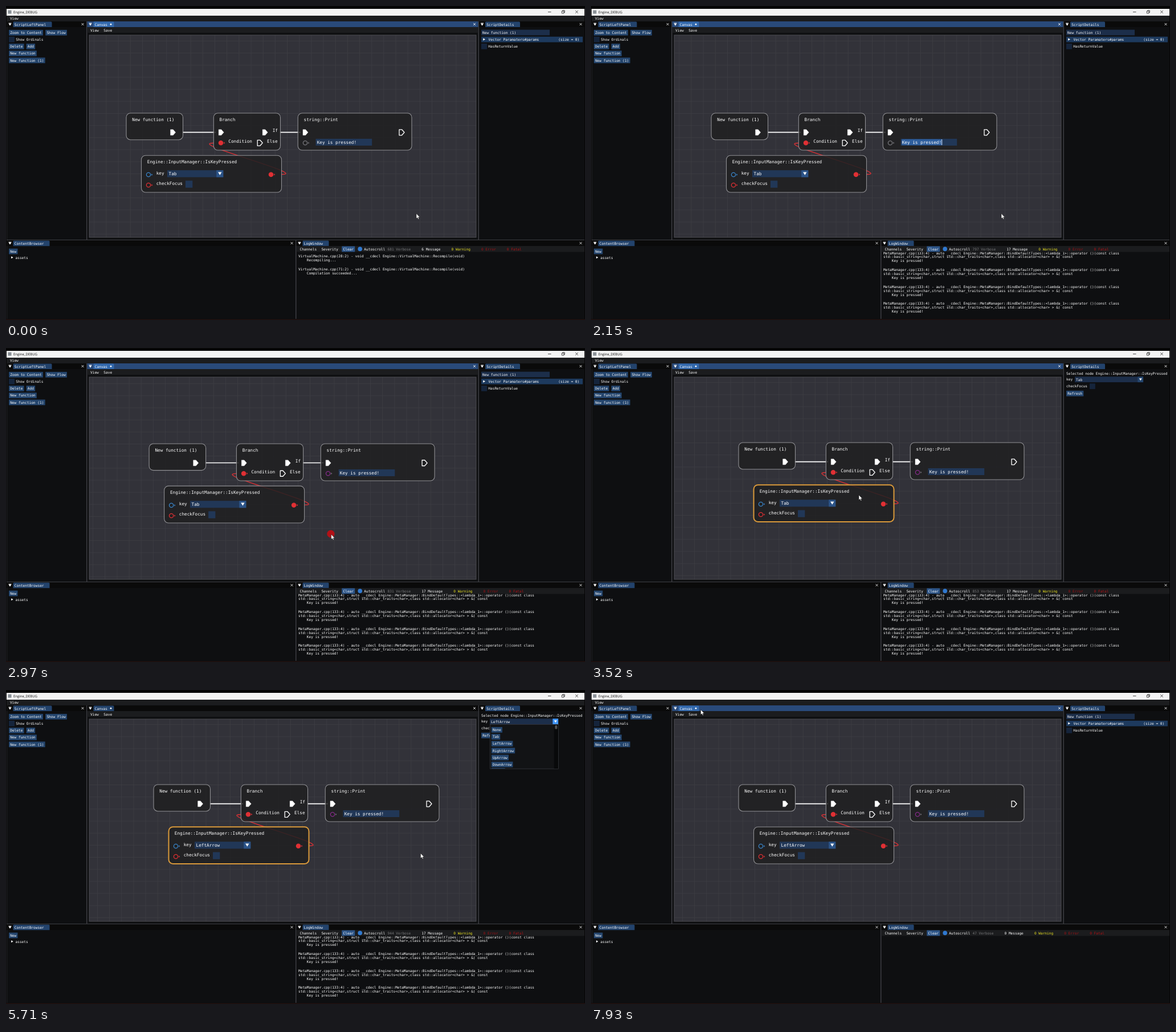
Recreate the animation shown at these times as an HTML page. Size 1016 by 551 pixels, loop 8000 ms.

```html
<!DOCTYPE html>
<html lang="en">
<head>
<meta charset="utf-8">
<title>Engine_DEBUG</title>
<style>
html, body { margin: 0; width: 100%; height: 100%; overflow: hidden; background: #0b0b0b; }
svg { display: block; width: 1016px; height: 551px; }
text { font-family: "DejaVu Sans Mono", monospace; text-rendering: geometricPrecision; white-space: pre; }
</style>
</head>
<body>
<svg id="stage" viewBox="0 0 1016 551"></svg>
<script>
const LOOP = 8000;
const UI = 6.15, NODE = 7.69, ADV = 3.704;
const C = {
  win: '#0e0f11', bar: '#0a0a0a', barOn: '#294a7a', tab: '#23436c', tabOn: '#3369ad',
  menu: '#1b1c1e', btn: '#24456d', hot: '#4296fa', frame: '#1c2e4a', box: '#15243b',
  red: '#e03034', gap: '#3c3d42'
};
const stage = document.getElementById('stage');

function el(tag, attrs, parent = stage) {
  const e = document.createElementNS('http://www.w3.org/2000/svg', tag);
  for (const k in attrs) e.setAttribute(k, attrs[k]);
  parent.appendChild(e);
  return e;
}
const set = (e, k, v) => e.setAttribute(k, v);
const show = (e, on) => set(e, 'display', on ? 'inline' : 'none');
const group = (parent = stage, attrs = {}) => el('g', attrs, parent);
const rect = (x, y, w, h, fill, p, more = {}) => el('rect', { x, y, width: w, height: h, fill, ...more }, p);
const path = (d, attrs, p) => el('path', { d, fill: 'none', ...attrs }, p);

// yc is the middle of the capitals
function text(s, x, yc, p, size = UI, fill = '#fff') {
  const e = el('text', { x, y: yc + size * 0.36, 'font-size': size, fill }, p);
  e.textContent = s;
  return e;
}
function button(s, x, yc, p, fill = C.btn) {
  const r = rect(x, yc - 4.9, s.length * ADV + 4.4, 9.8, fill, p);
  text(s, x + 2.2, yc, p);
  return r;
}
function cross(x, y, p, color = '#fff', r = 2) {
  path(`M${x - r},${y - r}l${2 * r},${2 * r}m0,${-2 * r}l${-2 * r},${2 * r}`, { stroke: color, 'stroke-width': 0.8 }, p);
}
const down = (x, y, r, p) => path(`M${x - r},${y - r * 0.75}h${2 * r}l${-r},${r * 1.6}z`, { fill: '#fff' }, p);
const right = (x, y, r, p) => path(`M${x - r * 0.8},${y - r}v${2 * r}l${r * 1.7},${-r}z`, { fill: '#fff' }, p);

function panel(title, x, y, w, h, tabW) {
  rect(x, y, w, h, C.win);
  const bar = rect(x, y, w, 10, C.bar);
  const tab = path(`M${x + 11},${y + 10}v-8q0,-1.5 1.5,-1.5h${tabW - 3}q1.5,0 1.5,1.5v8z`, { fill: C.tab });
  rect(x + 3, y + 2.6, 5, 0.9, '#fff');
  down(x + 5.5, y + 5.6, 2.4);
  text(title, x + 13.3, y + 5.3);
  cross(x + w - 6.5, y + 5, stage);
  return on => {
    set(bar, 'fill', on ? C.barOn : C.bar);
    set(tab, 'fill', on ? C.tabOn : C.tab);
  };
}

// ---- window frame
rect(0, 0, 1016, 551, '#050505');
rect(1, 5, 1014, 12, '#f3f3f3');
rect(3.5, 7.5, 6, 6, '#8a9096');
el('text', { x: 13, y: 13, 'font-size': 6, fill: '#111', style: 'font-family:"Open Sans",sans-serif' }).textContent = 'Engine_DEBUG';
path('M951,10.5h5.5M975.3,9h3.7v3.7h-3.7zM976.6,9v-1.2h3.7v3.7h-1.3', { stroke: '#222', 'stroke-width': 0.8 });
cross(1001.5, 10.3, stage, '#222', 2.3);
rect(1, 17, 1014, 10, C.menu);
text('View', 7, 22.2);
rect(1, 27, 1014, 522, C.gap);
rect(0, 549.5, 1016, 1.5, '#241312');

panel('ScriptLeftPanel', 1.5, 27, 139.5, 383, 68);
const focusCanvas = panel('Canvas', 142.5, 27, 686, 383, 36);
const focusDetails = panel('ScriptDetails', 830, 27, 185, 383, 61);
panel('ContentBrowser', 1.5, 411.2, 506.5, 138, 64);
const focusLog = panel('LogWindow', 509.5, 411.2, 505.5, 138, 46);
el('circle', { cx: 184, cy: 32.2, r: 1.4, fill: '#fff' });

// ---- left panel and content browser
button('Zoom to Content', 5, 46.8);
button('Show Flow', 69.2, 46.8);
rect(5, 53.8, 10, 9.8, C.box);
text('Show Ordinals', 17.3, 59);
button('Delete', 5, 71);
button('Add', 35.6, 71);
button('New function', 5, 83.2);
button('New function (1)', 5, 95.4);
button('New', 5, 430.6);
right(10.8, 441.2, 2, stage);
text('assets', 16.5, 441.4);

// ---- node canvas
rect(142.5, 37, 686, 10, C.menu);
text('View', 148, 42.4);
text('Save', 171.3, 42.4);
const defs = el('defs', {});
rect(146, 51, 679, 355, '#000', el('clipPath', { id: 'view' }, defs));
rect(510, 431.5, 505, 118, '#000', el('clipPath', { id: 'logView' }, defs));
const GRID = 21.17;
const grid = el('pattern', { id: 'grid', width: GRID, height: GRID, patternUnits: 'userSpaceOnUse' }, defs);
rect(0, 0, GRID, GRID, '#323239', grid);
path(`M.5,0V${GRID}M0,.5H${GRID}`, { stroke: '#3c3c43', 'stroke-width': 0.8 }, grid);
rect(146, 51, 679, 355, 'url(#grid)', stage);
const clip = group(stage, { 'clip-path': 'url(#view)' });
const nodes = group(clip);

const link = (d, stroke, w) => path(d, { stroke, 'stroke-width': w }, nodes);
link('M309,221.6H368', '#fff', 1.6);
link('M480,221.6H517', '#fff', 1.6);
link('M484,295.5C532,295.5 316,240.5 364,240.5', C.red, 1.3);

function node(title, x, y, w, h) {
  const r = rect(x, y, w, h, 'rgba(32,32,33,.84)', nodes, { rx: 7.5, stroke: '#8f8f93', 'stroke-width': 1.1 });
  text(title, x + 10.3, y + 11.5, nodes, NODE);
  return r;
}
function flow(x, y, filled) {
  path(`M${x},${y - 5}h4.6l4.4,5l-4.4,5h-4.6z`, {
    fill: filled ? '#fff' : 'none', stroke: '#fff', 'stroke-width': filled ? 0.4 : 1.3, 'stroke-linejoin': 'round'
  }, nodes);
}
function pin(x, y, color, filled) {
  path(`M${x + 5.2},${y - 1.8}v3.6l2.1,-1.8z`, { fill: color }, nodes);
  return el('circle', { cx: x, cy: y, r: 3.6, fill: filled ? color : '#202021', stroke: color, 'stroke-width': 1.3 }, nodes);
}
node('New function (1)', 211, 188, 99.5, 46.7);
flow(288.6, 221.8, true);

node('Branch', 364.3, 188, 117.2, 65);
flow(373.2, 221.8, true);
flow(450.2, 221.8, true);
flow(441.2, 240.3, false);
pin(377, 240.3, C.red, true);
text('Condition', 390.3, 237.2, nodes, NODE);
text('If', 467.7, 218.6, nodes, NODE);
text('Else', 458, 237.2, nodes, NODE);

node('string::Print', 512.2, 188, 199.8, 65);
flow(521, 221.8, true);
flow(690, 221.8, false);
const valuePin = pin(525, 240.3, '#77777c', false);
rect(543.5, 233, 98.7, 12, '#213757', nodes);
const marked = group(nodes);
rect(545.3, 233.8, 71, 10.4, '#2f5f9e', marked);
const caret = rect(615.3, 234, 0.8, 10, '#fff', marked);
text('Key is pressed!', 545.7, 239.2, nodes, NODE);

const keyNode = node('Engine::InputManager::IsKeyPressed', 237.5, 262.2, 246, 64.8);
pin(250, 296, '#3a86cc', false);
pin(250, 314.3, C.red, false);
pin(465, 295.8, C.red, true);
text('key', 263.7, 293.2, nodes, NODE);
rect(283, 288.2, 98.3, 12.2, '#213757', nodes);
rect(369.2, 288.2, 12.1, 12.2, '#2c5488', nodes);
down(375.3, 294, 3.2, nodes);
const nodeKey = text('Tab', 285.5, 294.6, nodes, NODE);
text('checkFocus', 263.7, 311.2, nodes, NODE);
rect(315, 306.5, 12.3, 12.3, '#213757', nodes);
rect(146, 51, 679, 355, 'none', stage, { stroke: '#55555b', 'stroke-width': 0.8 });

// ---- details: function view and node view
const fnView = group();
rect(834, 41.6, 120, 9.8, C.frame, fnView);
text('New function (1)', 836, 46.7, fnView);
rect(834, 53.8, 178, 9.8, '#1d3a5e', fnView);
right(839, 58.6, 2.2, fnView);
text('Vector Paramaters#params', 846.6, 58.8, fnView);
text('(size = 0)', 969.3, 58.8, fnView);
rect(834, 66, 10, 9.8, C.box, fnView);
text('HasReturnValue', 846.3, 71.2, fnView);

const nodeView = group();
text('Selected node Engine::InputManager::IsKeyPressed', 834, 45, nodeView);
text('key', 834, 54.8, nodeView);
rect(849, 50.3, 120, 9.8, C.frame, nodeView);
const drop = rect(959.3, 50.3, 9.8, 9.8, C.btn, nodeView);
down(964.3, 55, 2.5, nodeView);
const panelKey = text('Tab', 851, 55.5, nodeView);
text('checkFocus', 834, 66.6, nodeView);
rect(875, 62.3, 9.8, 9.8, C.box, nodeView);
button('Refresh', 834, 79.8, nodeView);

const popup = group();
rect(849.3, 60.6, 120, 77.6, '#121315', popup, { stroke: '#3d3e44', 'stroke-width': 0.7 });
rect(961.8, 61, 7.2, 77, '#08090a', popup);
rect(963.2, 62, 4.2, 6.5, '#4f4f4f', popup, { rx: 1.5 });
const items = ['None', 'Tab', 'LeftArrow', 'RightArrow', 'UpArrow', 'DownArrow']
  .map((s, i) => button(s, 851.7, 69.9 + 12.15 * i, popup));
rect(851.7, 137, 24, 1, C.btn, popup);

// ---- log
rect(509.5, 421.2, 505.5, 10.3, C.menu);
text('Channels', 515.5, 426.6);
text('Severity', 553.4, 426.6);
const clearBtn = button('Clear', 589.3, 426.5, stage, '#2c5487');
el('circle', { cx: 621.2, cy: 426.4, r: 3.8, fill: '#3079d0' });
text('Autoscroll', 628.3, 426.6);
const tallies = [['Verbose', '#77787a'], ['Message', '#fff'], ['Warning', '#e8e020'], ['Error', '#a01014'], ['Fatal', '#b01014']]
  .map(([name, color]) => ({ name, e: text('', 0, 426.6, stage, UI, color) }));

const LINE = 6.88, FIRST = 439.2, SHORT = 3 * LINE + 2.1, LONG = 4 * LINE + 2.1, LAST = 522.2, PRINTS = 11;
const logClip = group(stage, { 'clip-path': 'url(#logView)' });
const log = group(logClip);
function entry(lines, y) {
  const g = group(log);
  lines.forEach((s, i) => text(s, i === lines.length - 1 ? 513 + 4 * ADV : 513, y + i * LINE, g));
  return g;
}
['28:2|Recompiling...', '71:2|Compilation succeeded...'].forEach((s, i) => {
  const [at, msg] = s.split('|');
  entry([`VirtualMachine.cpp(${at}) - void __cdecl Engine::VirtualMachine::Recompile(void)`, msg], FIRST + SHORT * i);
});
const printY = i => FIRST + 2 * SHORT + LONG * i;
const prints = Array.from({ length: PRINTS }, (_, i) => entry([
  'MetaManager.cpp(133:4) - auto __cdecl Engine::MetaManager::BindDefaultTypes::<lambda_1>::operator ()(const class',
  'std::basic_string<char,struct std::char_traits<char>,class std::allocator<char> > &) const',
  'Key is pressed!'
], printY(i)));

// ---- pointer
const press = el('circle', { r: 6.6, fill: '#c40d12', 'fill-opacity': 0.88 });
const pointer = path('M0,0V8.8L2,7L3.4,10L4.8,9.4L3.5,6.5H6.2Z', { fill: '#fff', stroke: '#111', 'stroke-width': 0.5 });

// ---- timing
const T = { tab: 560, every: 155, grab: 2850, drop: 3040, pick: 3500, combo: 4310, open: 4420,
  choose: 5180, close: 5850, clear: 6750, cleared: 6890, back: 7350 };
const GRAB = [530.5, 347];
const ROUTE = [
  [0, 720, 364.3], [2600, 720, 364.3], [T.grab, ...GRAB], [2970, 570.5, 327], [T.drop, 578.5, 325],
  [3150, 578.5, 325], [3450, 470, 258], [3620, 470, 258], [4260, 952, 54], [4480, 952, 54],
  [4930, 872, 93], [5280, 872, 93], [5690, 727.5, 286.5], [5950, 727.5, 286.5], [6700, 595, 428],
  [6920, 595, 428], [7280, 520, 350], [7660, 520, 350], [7910, 192.5, 34.5], [8000, 192.5, 34.5]
];
const VERBOSE = [[0, 681], [2150, 797], [2970, 831], [4320, 887], [5710, 944], [6770, 994], [T.cleared, 999]];

function along(keys, t, ease = u => u) {
  let i = 1;
  while (i < keys.length - 1 && t > keys[i][0]) i++;
  const a = keys[i - 1], b = keys[i];
  const u = ease(Math.min(1, Math.max(0, (t - a[0]) / (b[0] - a[0]))));
  return a.slice(1).map((v, k) => v + (b[k + 1] - v) * u);
}
const smooth = u => u * u * (3 - 2 * u);
const within = (t, a, b) => t >= a && t < b;
const countAt = t => Math.max(0, Math.min(PRINTS, Math.floor((t - T.tab) / T.every) + 1));

function draw(t) {
  const dragging = within(t, T.grab, T.drop);
  const [x, y] = along(ROUTE, t, dragging ? undefined : smooth);
  set(pointer, 'transform', `translate(${x},${y})`);
  set(press, 'cx', x - 0.7);
  set(press, 'cy', y - 0.8);
  show(press, dragging);

  const dx = t < T.grab ? 0 : dragging ? x - GRAB[0] : 48;
  const dy = t < T.grab ? 0 : dragging ? y - GRAB[1] : -22;
  set(nodes, 'transform', `translate(${dx},${dy})`);
  set(grid, 'patternTransform', `translate(${154.3 + dx},${61 + dy})`);
  set(valuePin, 'stroke', t < T.grab ? '#77777c' : '#872c8c');

  const picked = within(t, T.pick, T.back);
  set(keyNode, 'stroke', picked ? '#d9993a' : '#8f8f93');
  set(keyNode, 'stroke-width', picked ? 2 : 1.1);
  show(fnView, !picked);
  show(nodeView, picked);

  show(marked, within(t, T.tab, T.grab));
  show(caret, (t - T.tab) % 1200 < 800);

  const key = t < T.choose ? 'Tab' : 'LeftArrow';
  nodeKey.textContent = panelKey.textContent = key;
  const open = within(t, T.open, T.close);
  show(popup, open);
  const overCombo = x > 849 && x < 969 && y > 50 && y < 60;
  set(drop, 'fill', open || overCombo ? C.hot : C.btn);
  items.forEach((r, i) => {
    const top = 65 + 12.15 * i;
    set(r, 'fill', x > 851 && x < 892 && y > top && y < top + 9.8 ? C.hot : C.btn);
  });

  focusCanvas(t < T.combo || within(t, T.close, T.clear) || t >= T.back);
  focusDetails(within(t, T.combo, T.open));
  focusLog(within(t, T.clear, T.back));
  set(clearBtn, 'fill', x > 589 && x < 612 && y > 421 && y < 431 ? '#2a8cf8' : '#2c5487');

  const cleared = t >= T.cleared;
  const n = countAt(t), settled = countAt(t - 28);
  show(log, !cleared);
  prints.forEach((g, i) => show(g, i < n));
  set(log, 'transform', `translate(0,${-Math.max(0, printY(settled - 1) - LAST)})`);

  const verbose = cleared ? (t - T.cleared) * 0.0453 : along(VERBOSE, t)[0];
  const values = [Math.floor(verbose + 0.01), cleared ? 0 : 6 + n, 0, 0, 0];
  let tx = 669.5;
  tallies.forEach(({ name, e }, i) => {
    const s = `${values[i]} ${name}`;
    e.textContent = s;
    set(e, 'x', tx);
    // the message column keeps its width for one or two digits alike to the next gap
    tx += s.length * ADV + 19;
  });
}

function tick() {
  draw(performance.now() % LOOP);
  requestAnimationFrame(tick);
}
tick();
</script>
</body>
</html>
```
